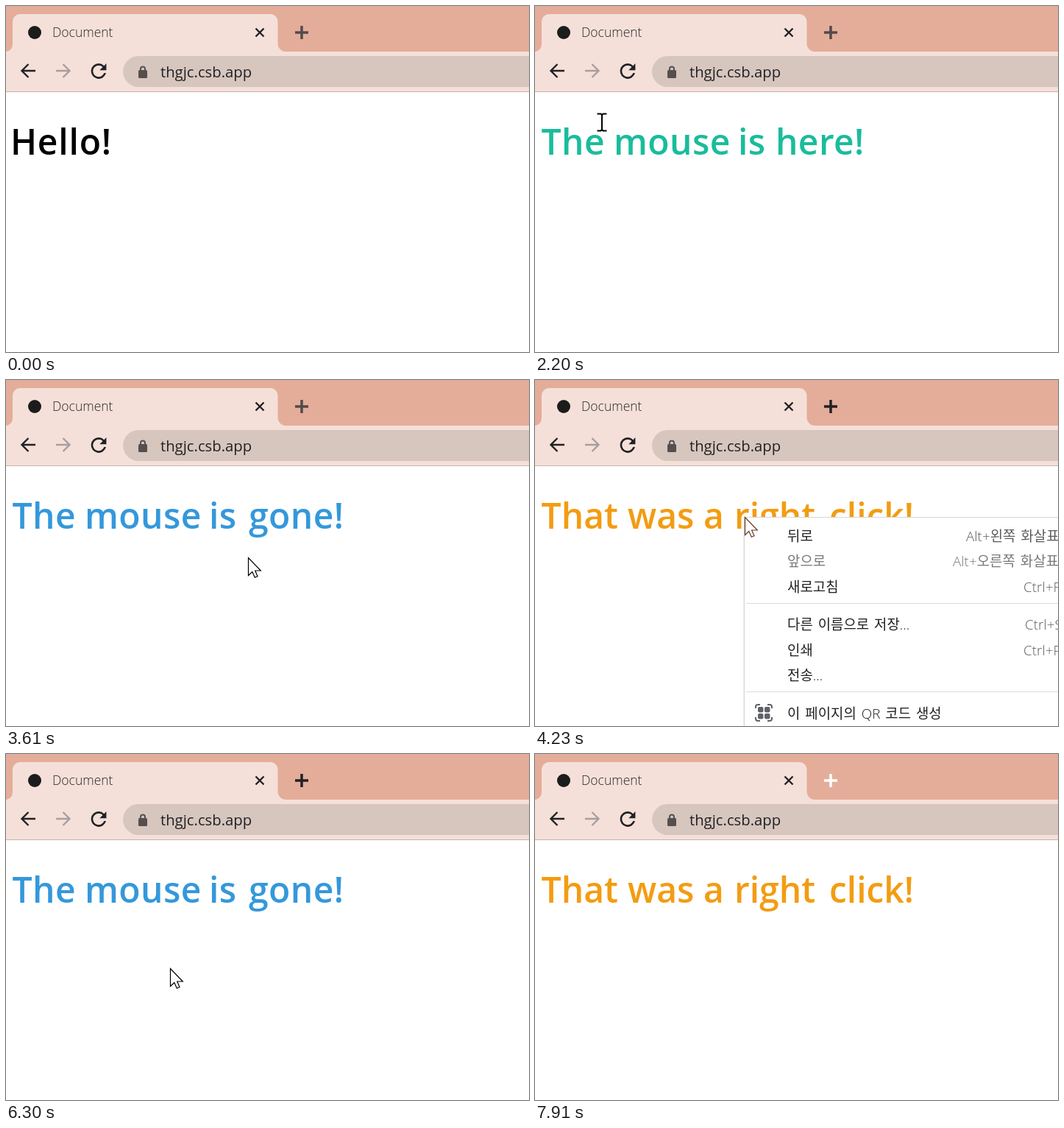
An HTML page for the animation above (8000 ms loop, 711 px wide and 470 px high).

```html
<!DOCTYPE html>
<html lang="ko">
<head>
<meta charset="utf-8">
<title>Mouse events</title>
<style>
html, body { margin: 0; width: 100%; height: 100%; overflow: hidden; background: #fff; }
svg { display: block; width: 711px; height: 470px; font-family: "Open Sans", "Noto Sans CJK KR", "Noto Sans CJK", sans-serif; }
text { white-space: pre; }
.head { font-size: 48px; font-weight: 600; }
.thin { font-weight: 350; }
.line { fill: none; stroke: #202124; stroke-width: 2.4; }
</style>
</head>
<body>
<svg viewBox="0 0 711 470">
  <rect width="711" height="470" fill="#fff"/>
  <rect width="711" height="62" fill="#e4ad9a"/>
  <path fill="#f5e0d9" d="M0 62A9 10 0 0 0 9 52V21A10 10 0 0 1 19 11H359.500A10 10 0 0 1 369.500 21V51A11 11 0 0 0 380.500 62H711V116H0Z"/>
  <rect y="116" width="711" height="1" fill="#c8b4ac"/>
  <rect x="159" y="68" width="600" height="42" rx="21" fill="#d7c6be"/>

  <circle cx="39" cy="36" r="9" fill="#1c1c1c"/>
  <text class="thin" x="63" y="42" font-size="17.500" fill="#2c2a29">Document</text>
  <path class="line" d="M339.500 30.500l11 11m0-11l-11 11"/>
  <path id="plus" fill="none" stroke-width="3.500" d="M393 36h18M402 27v18"/>

  <path class="line" d="M40 88H22M30.500 79l-9 9 9 9"/>
  <path class="line" style="stroke:#a89e9f" d="M68 88H86M77.500 79l9 9-9 9"/>
  <path fill="#202124" transform="translate(110.400 72.900) scale(1.300)" d="M17.650 6.350A7.960 7.960 0 0 0 12 4a8 8 0 1 0 7.730 10h-2.080A6 6 0 1 1 12 6c1.660 0 3.140.690 4.220 1.780L13 11h7V4z"/>
  <rect x="180" y="87" width="12" height="11" rx="1.500" fill="#55504f"/>
  <path fill="none" stroke="#55504f" stroke-width="2" d="M183 88v-2.500a3 3 0 0 1 6 0V88"/>
  <text x="210" y="97" font-size="20.300" fill="#202124">thgjc.csb.app</text>

  <g id="heads" class="head"></g>
  <g id="menu">
    <rect x="283" y="186" width="500" height="400" fill="#000" opacity=".05"/>
    <rect x="284.500" y="186.500" width="500" height="400" fill="#fff" stroke="#d3d6da"/>
    <path stroke="#dadce0" d="M287 303.500H750M287 423.500H750"/>
    <g id="rows" class="thin" font-size="18.900" word-spacing="2"></g>
    <path fill="none" stroke="#5f6368" stroke-width="2" d="M300 446v-2q0-3 3-3h3M316 441h3q3 0 3 3v2M322 458v2q0 3-3 3h-3M306 463h-3q-3 0-3-3v-2"/>
    <g id="dots" fill="#5f6368"></g>
  </g>
  <path id="arrow" fill="#fff" stroke-width="1.200" d="M.500.500V24.500L5.800 19.500 9.300 27.300 13 25.700 9.700 18H17.300Z"/>
  <path id="beam" fill="none" stroke="#000" stroke-width="2" d="M-6.500-11.500h5l1.500 1.500 1.500-1.500h5M0-10.500V10.500M-6.500 11.500h5L0 10l1.500 1.500h5"/>
  <circle id="glow" cx="260.500" cy="230.500" r="18" fill="#ff0" fill-opacity=".5"/>
</svg>
<script>
const NS = "http://www.w3.org/2000/svg";
const LOOP = 8000;
const $ = id => document.getElementById(id);

function add(parent, tag, attrs, text) {
  const el = document.createElementNS(NS, tag);
  for (const k in attrs) el.setAttribute(k, attrs[k]);
  if (text) el.textContent = text;
  return parent.appendChild(el);
}

// Each heading: colour, letter spacing, then words with their left edge
const headings = {
  hello: ["#000", .8, [["Hello!", 6]]],
  here: ["#1abc9c", .4, [["The", 8.5], ["mouse", 107], ["is", 276], ["here!", 327]]],
  gone: ["#3498db", .4, [["The", 8.5], ["mouse", 107], ["is", 276], ["gone!", 330]]],
  click: ["#f39c12", 0, [["That", 8.5], ["was", 126], ["a", 229], ["right", 271], ["click!", 400]]]
};
const headEls = {};
for (const name in headings) {
  const [fill, gap, words] = headings[name];
  headEls[name] = add($("heads"), "g", { fill, "letter-spacing": gap });
  for (const [word, x] of words) add(headEls[name], "text", { x, y: 202 }, word);
}

// Label, row centre, shortcut, shortcut's left edge
const rows = [
  ["뒤로", 212, "Alt+왼쪽 화살표", 586],
  ["앞으로", 246.5, "Alt+오른쪽 화살표", 568],
  ["새로고침", 281, "Ctrl+R", 664],
  ["다른 이름으로 저장...", 332, "Ctrl+S", 666],
  ["인쇄", 367, "Ctrl+P", 664],
  ["전송...", 401],
  ["이 페이지의 QR 코드 생성", 453]
];
rows.forEach(([label, mid, keys, x], i) => {
  const y = mid + 6.5;
  add($("rows"), "text", { x: 343, y, fill: i === 1 ? "#78797c" : "#202124" }, label);
  if (keys) add($("rows"), "text", { x, y, fill: i === 1 ? "#78797c" : "#5c5c5c" }, keys);
});
for (const x of [303, 312])
  for (const y of [444, 453]) add($("dots"), "rect", { x, y, width: 7.5, height: 7.5, rx: 2 });

// Pointer moves: start, time per step, one point per step
const moves = [
  [0, 70, "-99,-99"],
  [1130, 70, "568,461 438,372 285,290 191,238"],
  [1660, 70, "178,222 130,180 82,154"],
  [2200, 66, "91,158 115,178 140,205 165,232 188,258 198,270"],
  [2730, 70, "215,240 240,205 252,188"],
  [3200, 80, "262,202 290,235 325,268 355,282 350,272 329,241 302,208 285,186"],
  [5220, 66, "280,200 270,218 262,231 263,231.5"],
  [5550, 70, "262,229"],
  [5830, 65, "258,222 235,204 214,190"],
  [6230, 70, "216,232 223,291 226,301"],
  [6490, 74, "230,292 240,270 252,250 264,234 275,222 283,215"],
  [7510, 70, "240,262 142,381 -99,-99"]
].map(([at, step, pts]) => [at, step, pts.split(" ").map(p => p.split(",").map(Number))]);

const states = [
  [0, "hello"], [1730, "here"], [2398, "gone"], [2800, "here"], [3280, "gone"],
  [3680, "here"], [4020, "click"], [5350, "gone"], [5895, "here"], [6230, "gone"],
  [6860, "here"], [7050, "click"]
];

const latest = (list, t) => list.filter(e => e[0] <= t).pop();
const show = (el, on) => el.setAttribute("display", on ? "inline" : "none");
const within = (t, a, b) => t >= a && t < b;

function draw(t) {
  const [at, step, pts] = latest(moves, t);
  const [x, y] = pts[Math.min(pts.length - 1, Math.floor((t - at) / step))];
  const state = latest(states, t)[1];
  for (const name in headEls) show(headEls[name], name === state);

  const first = within(t, 4090, 5350), second = within(t, 7110, 7910);
  show($("menu"), first || second);
  $("menu").setAttribute("transform", second ? "translate(-2 28)" : "");
  $("plus").setAttribute("stroke", t < 4020 ? "#504b4a" : t < 7910 ? "#202124" : "#fff");

  const pressed = within(t, 5418, 5550);
  const beam = pressed || (y < 217 && !first && !second);
  show($("beam"), beam);
  show($("arrow"), !beam);
  $("arrow").setAttribute("stroke", first ? "#6b3a22" : "#000");
  $(beam ? "beam" : "arrow").setAttribute("transform", `translate(${x} ${y})`);
  show($("glow"), within(t, 5350, 5550));
}

const start = performance.now();
function tick() {
  draw((performance.now() - start) % LOOP);
  requestAnimationFrame(tick);
}
tick();
</script>
</body>
</html>
```
